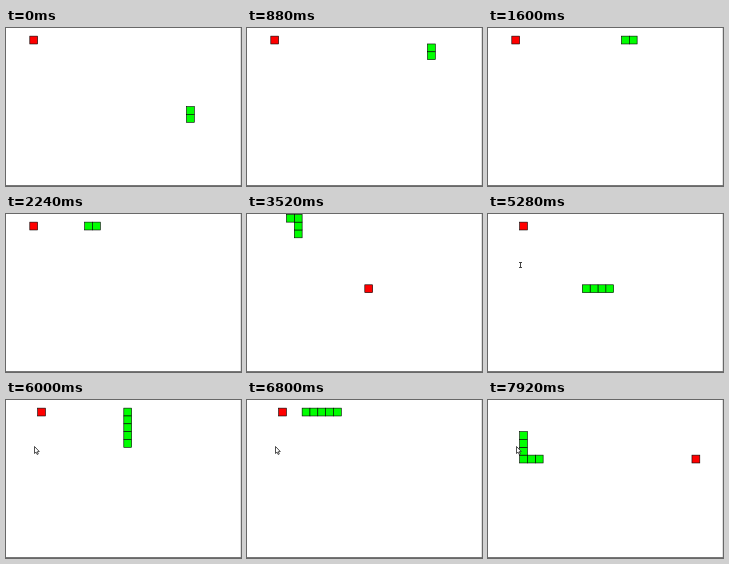
These frames come from a looping animation (235 by 158 pixels, 8000 ms). An HTML page with a canvas:

```html
<!DOCTYPE html>
<html lang="en">
<head>
<meta charset="utf-8">
<title>Snake</title>
<style>
  html, body { margin: 0; width: 100%; height: 100%; overflow: hidden; background: #fff; }
  canvas { display: block; width: 235px; height: 158px; }
</style>
</head>
<body>
<canvas id="stage" width="235" height="158"></canvas>
<script>
const ctx = document.getElementById('stage').getContext('2d');
const W = 235, H = 158, LOOP = 8000, FRAME = 80;
const CELL = W / 30, LINE = 0.6;
const IBEAM_AT = 4400, ARROW_AT = 5600;

const DIRS = { U: [0, -1], D: [0, 1], L: [-1, 0], R: [1, 0] };
const START = [[23, 10], [23, 11]];
const APPLES = [[3, 1], [6, 1], [15, 9], [4, 1], [26, 7]];

// Heading, number of cells and the time the run ends; steps are spread evenly.
const ROUTE = [
  ['U', 9, 990], ['L', 20, 2900], ['U', 1, 2990], ['R', 3, 3280], ['D', 9, 4320],
  ['R', 9, 5270], ['U', 8, 5930], ['L', 11, 7124], ['D', 6, 7750], ['R', 2, 7910]
];

function headingsUntil(time) {
  const headings = [];
  let begin = 0;
  for (const [dir, cells, end] of ROUTE) {
    const progress = Math.min(1, (time - begin) / (end - begin));
    if (progress < 0) break;
    const steps = Math.floor(progress * cells + 1e-6);
    for (let i = 0; i < steps; i++) headings.push(DIRS[dir]);
    begin = end;
  }
  return headings;
}

// Replays the game; the body grows on the step after eating.
function gameAt(time) {
  const snake = [...START];
  let eaten = 0, growing = false;
  for (const [dx, dy] of headingsUntil(time)) {
    const [x, y] = snake[0];
    snake.unshift([x + dx, y + dy]);
    if (!growing) snake.pop();
    growing = String(snake[0]) === String(APPLES[eaten]);
    if (growing) eaten++;
  }
  return { snake, apple: APPLES[eaten] };
}

function drawCell([col, row], color) {
  const x = col * CELL + LINE / 2, y = row * CELL + LINE / 2;
  ctx.fillStyle = color;
  ctx.fillRect(x, y, CELL, CELL);
  ctx.lineWidth = LINE;
  ctx.strokeStyle = '#000';
  ctx.strokeRect(x, y, CELL, CELL);
}

function drawIBeam() {
  ctx.fillStyle = '#444';
  ctx.fillRect(32, 49, 1, 4);
  ctx.fillRect(31, 48, 3, 1);
  ctx.fillRect(31, 53, 3, 1);
}

function drawArrow() {
  const outline = [[0, 0], [0, 7], [1.6, 5.6], [2.7, 8], [3.8, 7.5], [2.8, 5.2], [4.8, 5]];
  ctx.beginPath();
  for (const [x, y] of outline) ctx.lineTo(28.5 + x, 46.5 + y);
  ctx.closePath();
  ctx.fillStyle = '#fff';
  ctx.fill();
  ctx.lineWidth = 0.8;
  ctx.strokeStyle = '#222';
  ctx.stroke();
}

function drawBoard() {
  ctx.fillStyle = '#fff';
  ctx.fillRect(0, 0, W, H);
  ctx.fillStyle = '#ddd';
  ctx.fillRect(W - 1, 0, 1, H);
  ctx.fillStyle = '#777';
  ctx.fillRect(0, H - 1, W, 1);
}

function draw(time) {
  const { snake, apple } = gameAt(time);
  drawBoard();
  drawCell(apple, '#f00');
  for (const part of snake) drawCell(part, '#0f0');
  if (time >= ARROW_AT) drawArrow();
  else if (time >= IBEAM_AT) drawIBeam();
}

const start = performance.now();
function frame() {
  const time = (performance.now() - start) % LOOP;
  draw(Math.floor(time / FRAME) * FRAME);
  requestAnimationFrame(frame);
}
frame();
</script>
</body>
</html>
```
